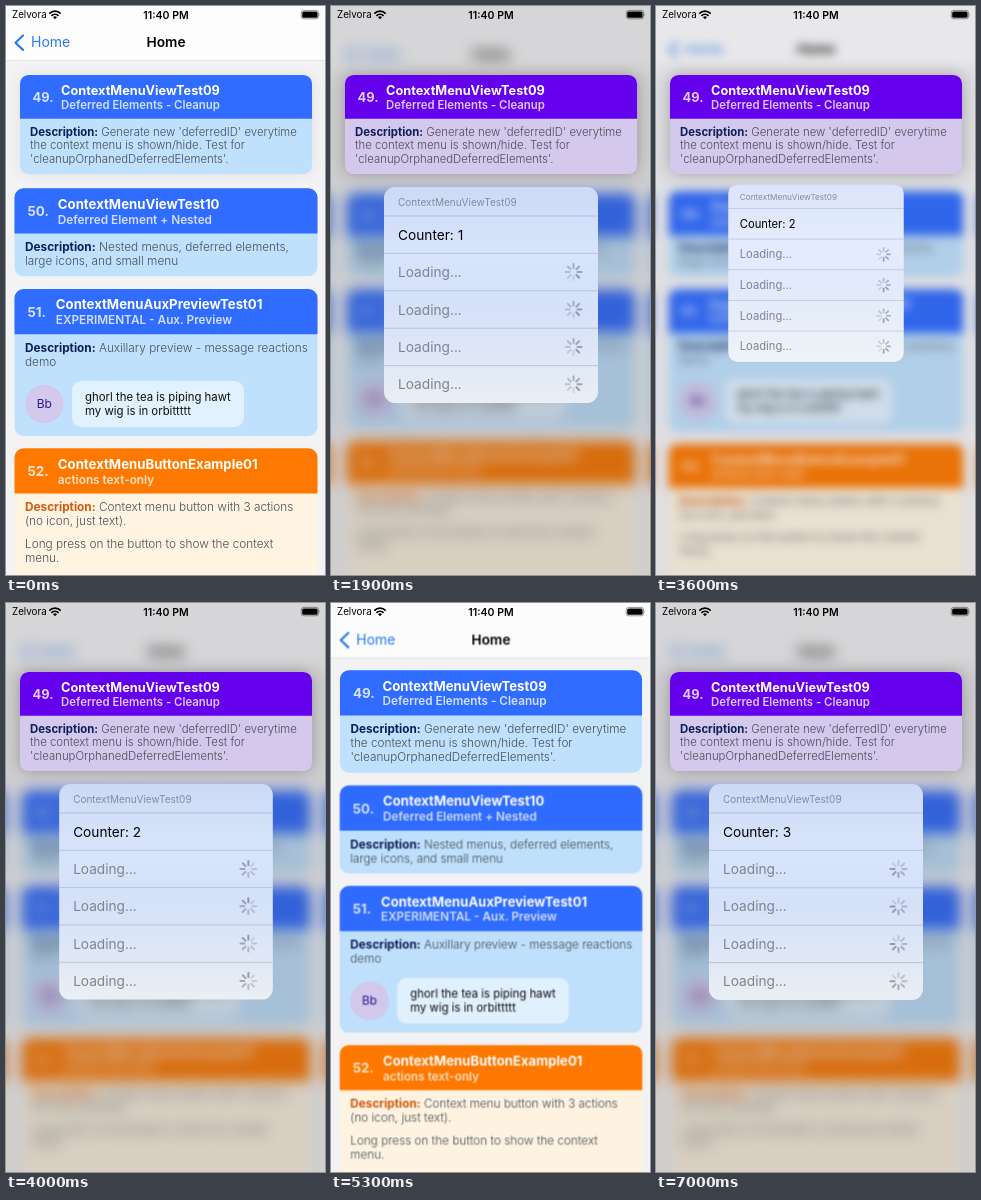
Write an HTML page that moves like this. It is 319 by 569 pixels and loops after 7.1 s.

```html
<!DOCTYPE html>
<html>
<head>
<meta charset="utf-8">
<style>
html, body { margin: 0; width: 100%; height: 100%; overflow: hidden; background: #f3f3f5; }
svg { display: block; width: 100vw; height: 100vh; font-family: Inter, "Liberation Sans", sans-serif; }
.title { font-size: 13.2px; font-weight: 700; fill: #fff; }
.sub { font-size: 11.8px; font-weight: 600; fill: #fff; opacity: .78; }
.num { font-size: 13.4px; font-weight: 700; fill: #fff; opacity: .8; }
.body { font-size: 11.8px; font-weight: 300; fill: #474e58; }
.body .lead { font-weight: 700; }
.chat { font-size: 11.4px; fill: #111; }
.item { font-size: 13.7px; }
</style>
</head>
<body>
<svg id="stage" viewBox="0 0 319 569"></svg>
<script>
const LOOP = 7100;
// Opening and closing time of the menu for each showing
const SHOWS = [[75, 2050], [3475, 4650], [5975, Infinity]];
const BLUE = [48, 108, 255], PURPLE = [101, 0, 236];
const PALE_BLUE = [192, 225, 253], PALE_PURPLE = [212, 200, 237];
const MENU = { x: 53, y: 181, w: 214, h: 216, head: 29, row: 37.4 };

const rgb = c => `rgb(${c.map(Math.round)})`;
const mix = (a, b, k) => a.map((v, i) => v + (b[i] - v) * k);
const clamp = v => Math.max(0, Math.min(1, v));
const text = (x, y, cls, s, more = '') => `<text x="${x}" y="${y}" class="${cls}" ${more}>${s}</text>`;

function card({ y, h, num, titleX, title, sub, lines, head, pale, lead }) {
  const first = `<tspan class="lead" fill="${lead}">Description:</tspan> ${lines[0]}`;
  return `<rect class="pale" x="8.5" y="${y}" width="303" height="${h}" rx="9" fill="${pale}"/>
    <path class="head" fill="${head}" d="M8.5 ${y + 45.3}v-36.3a9 9 0 0 1 9 -9h285a9 9 0 0 1 9 9v36.3z"/>` +
    text(21.5, y + 28, 'num', num + '.') +
    text(titleX, y + 20.3, 'title', title) +
    text(titleX, y + 35.2, 'sub', sub) +
    [first, ...lines.slice(1)].map((s, i) => text(19, y + 62.8 + 14.2 * i, 'body', s)).join('');
}

const blueCard = o => card({ head: rgb(BLUE), pale: rgb(PALE_BLUE), lead: '#0c1f57', ...o });

const nav = `
  <rect x="-100" y="-100" width="519" height="154.5" fill="#fdfdfe"/>
  <path d="M-100 54.5h519" stroke="#d9d9dc" stroke-width=".6"/>
  <path d="M17 29.5l-7.5 7.2l7.5 7.2" fill="none" stroke="#2a7bf2" stroke-width="2.2" stroke-linecap="round" stroke-linejoin="round"/>
  ${text(25, 41.3, '', 'Home', 'font-size="14" fill="#2a7bf2"')}
  ${text(160, 41.3, '', 'Home', 'font-size="13.7" font-weight="600" text-anchor="middle"')}`;

const list = blueCard({
  y: 182.3, h: 88, num: 50, titleX: 51.8, title: 'ContextMenuViewTest10', sub: 'Deferred Element + Nested',
  lines: ['Nested menus, deferred elements,', 'large icons, and small menu']
}) + blueCard({
  y: 283, h: 147, num: 51, titleX: 49.8, title: 'ContextMenuAuxPreviewTest01', sub: 'EXPERIMENTAL - Aux. Preview',
  lines: ['Auxillary preview - message reactions', 'demo']
}) + `<circle cx="38.3" cy="398" r="19.3" fill="#d3c9ec"/>
  ${text(38.3, 402.3, '', 'Bb', 'font-size="12" fill="#31158f" text-anchor="middle"')}
  <rect x="66" y="375" width="172" height="46" rx="9.5" fill="#e2f1fe"/>
  ${text(79, 395, 'chat', 'ghorl the tea is piping hawt')}
  ${text(79, 409.3, 'chat', 'my wig is in orbittttt')}` +
card({
  y: 442.3, h: 200, num: 52, titleX: 51.8, title: 'ContextMenuButtonExample01', sub: 'actions text-only',
  lines: ['Context menu button with 3 actions', '(no icon, just text).'],
  head: '#ff7900', pale: '#fff4e2', lead: '#cf5a10'
}) + text(19, 542, 'body', 'Long press on the button to show the context') + text(19, 556.2, 'body', 'menu.');

const topCard = blueCard({
  y: 67.2, h: 102.7, num: 49, titleX: 51.2, title: 'ContextMenuViewTest09', sub: 'Deferred Elements - Cleanup',
  lines: ["Generate new 'deferredID' everytime", 'the context menu is shown/hide. Test for', "'cleanupOrphanedDeferredElements'."]
});

const spoke = i => `<path class="spoke" d="M0 -4v-4" transform="rotate(${i * 45})"/>`;
const spinner = `<g stroke="#4a5160" stroke-width="2" stroke-linecap="round">${[0, 1, 2, 3, 4, 5, 6, 7].map(spoke).join('')}</g>`;

function menuRow(i) {
  const y = MENU.y + MENU.head + i * MENU.row, mid = y + MENU.row / 2;
  return `<path d="M${MENU.x} ${y}h${MENU.w}" stroke="#a9b5cc" stroke-width=".7"/>` + (i
    ? text(67, mid + 5, 'item', 'Loading...', 'fill="#7d8492"') + `<g transform="translate(242.5 ${mid})">${spinner}</g>`
    : text(67, mid + 5, 'item', '', 'id="counter"'));
}

const panel = more => `<rect x="${MENU.x}" y="${MENU.y}" width="${MENU.w}" height="${MENU.h}" rx="11" ${more}/>`;
const menu = panel('fill="url(#glass)"') + panel('id="frost" fill="#fff"') +
  text(67, 200, '', 'ContextMenuViewTest09', 'font-size="10" fill="#838b9c"') +
  [0, 1, 2, 3, 4].map(menuRow).join('');

const status = `
  ${text(6, 12.3, '', 'Zelvora', 'font-size="9.8"')}
  <g fill="none" stroke="#000" stroke-width="1.7">
    <path d="M43.3 7.6a8 8 0 0 1 11.4 0M45.4 9.8a5 5 0 0 1 7.2 0"/>
  </g>
  <path d="M49 13.2l-2 -2a2.9 2.9 0 0 1 4 0z"/>
  ${text(160, 12.5, '', '11:40 PM', 'font-size="10.5" font-weight="600" text-anchor="middle"')}
  <rect x="295.2" y="4.4" width="17.4" height="8.4" rx="2.4" fill="none" stroke="#000" stroke-opacity=".5" stroke-width=".8"/>
  <rect x="296.2" y="5.4" width="15.4" height="6.4" rx="1.6"/>
  <path d="M313.6 7.2q1.3 1.4 0 2.8z" fill-opacity=".5"/>`;

const $ = id => document.getElementById(id);
// The list is mirrored past both side edges, where the shrunken page leaves a gap
$('stage').innerHTML = `
  <linearGradient id="glass" x2="0" y2="1">
    <stop stop-color="#cddaf6"/><stop offset=".3" stop-color="#d8e4fb"/>
    <stop offset=".55" stop-color="#d5e1f9"/><stop offset=".8" stop-color="#dfe8f6"/><stop offset="1" stop-color="#e9eff4"/>
  </linearGradient>
  <g id="page">
    <rect x="-100" y="-100" width="519" height="769" fill="#f3f3f5"/>
    <g id="list">${list}</g>
    <use href="#list" transform="scale(-1 1)"/>
    <use href="#list" transform="translate(638) scale(-1 1)"/>
    ${nav}
  </g>
  <rect id="dim" width="319" height="569" fill="#3f3f41"/>
  <g id="card">${topCard}</g>
  <g id="menu">${menu}</g>
  <g>${status}</g>`;

const cardHead = document.querySelector('#card .head');
const cardPale = document.querySelector('#card .pale');
const spokes = document.querySelectorAll('.spoke');

// Share still to go of a critically damped spring after t ms
const rest = (t, speed) => t <= 0 ? 1 : (1 + speed * t) * Math.exp(-speed * t);
const scaleAt = (x, y, s) => `translate(${x} ${y}) scale(${s}) translate(${-x} ${-y})`;

function draw(t) {
  const n = SHOWS.findLastIndex(([open]) => t >= open - 445);
  const [open, close] = SHOWS[n];
  const left = rest(t - close, .0094);
  const shown = (1 - rest(t - open, .014)) * left;
  const pressed = clamp((t - open + 445) / 300) * left ** .6;
  const raised = clamp((t - open + 65) / 80);
  const purple = raised * (1 - clamp((t - close - 20) / 180));
  const lift = (.25 * pressed + .75 * raised) * left;

  $('page').setAttribute('transform', scaleAt(159.5, 284.5, 1 - .047 * shown ** .8));
  $('page').style.filter = shown > .005 ? `blur(${7.5 * shown ** .7}px)` : 'none';
  $('dim').setAttribute('opacity', .2 * shown);

  $('card').setAttribute('transform', scaleAt(160, 118.5, 1 - .036 * pressed));
  $('card').style.filter = lift > .005 ? `drop-shadow(0 0 8px rgba(0,0,0,${.28 * lift}))` : 'none';
  cardHead.setAttribute('fill', rgb(mix(BLUE, PURPLE, purple)));
  cardPale.setAttribute('fill', rgb(mix(PALE_BLUE, PALE_PURPLE, purple)));

  $('menu').setAttribute('transform', scaleAt(160, 168, Math.max(.01, shown ** .31)));
  $('menu').setAttribute('opacity', clamp((shown - .06) * 2.5));
  $('frost').setAttribute('opacity', .6 * (1 - shown));
  $('counter').textContent = `Counter: ${n + 1}`;

  const step = Math.floor(t / 100);
  spokes.forEach((s, i) => s.setAttribute('opacity', .16 + .05 * ((i - step % 8 + 15) % 8)));
}

function tick() {
  draw(performance.now() % LOOP);
  requestAnimationFrame(tick);
}
tick();
</script>
</body>
</html>
```
